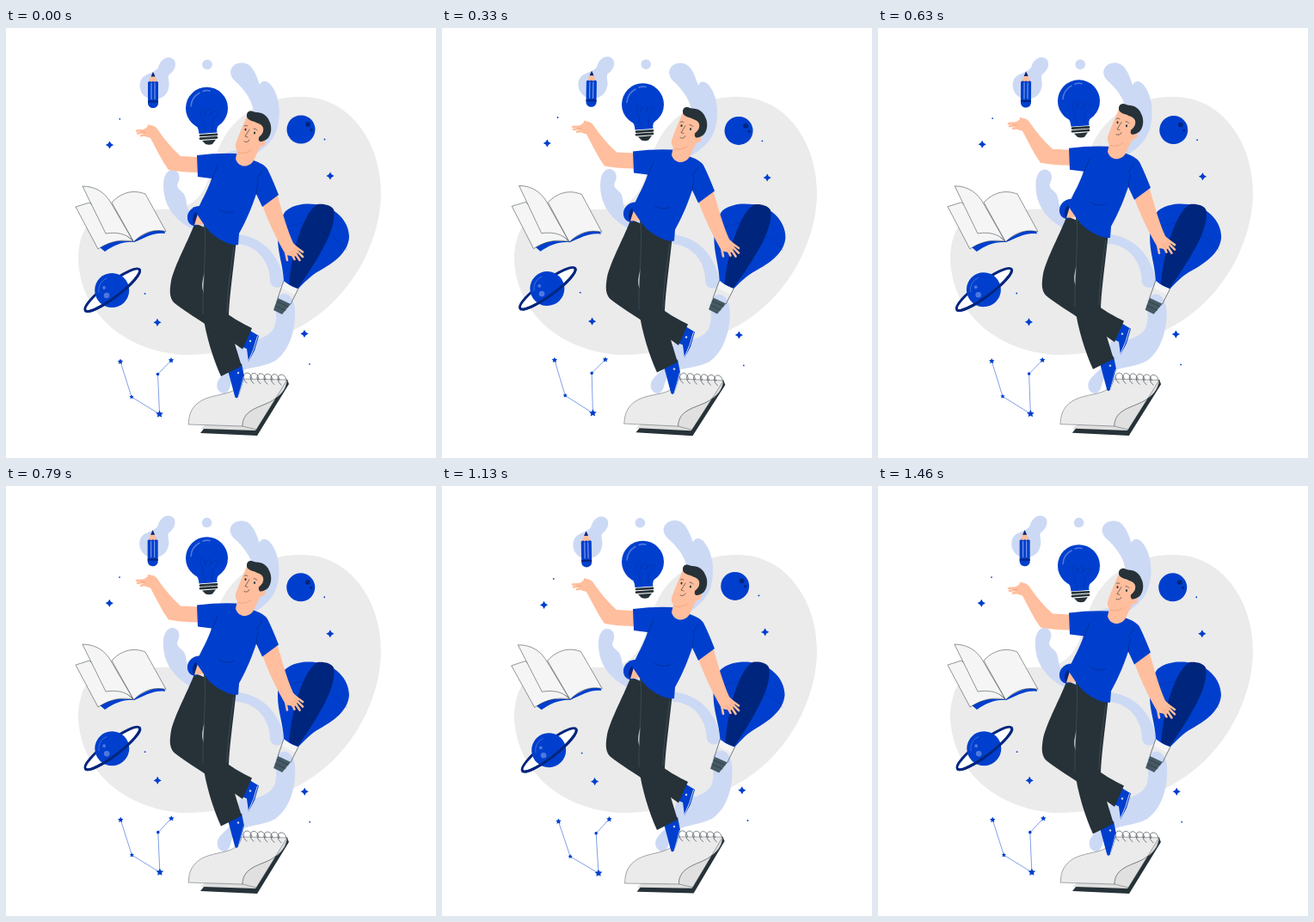
An HTML page that plays this animation: 500x500 px, repeating every 1500 ms.

```html
<!DOCTYPE html>
<html lang="en">
<head>
<meta charset="utf-8">
<title>Floating ideas</title>
<style>
  html, body { margin: 0; width: 100%; height: 100%; overflow: hidden; background: #fff; }
  svg { display: block; width: 100vw; height: 100vh; }
  .blue { fill: #003fcd; }
  .navy { fill: #00257d; }
  .pale { fill: #ccd9f5; }
  .dark { fill: #263238; }
  .skin { fill: #ffbe9d; }
  .fingers { fill: none; stroke: #ffbe9d; stroke-width: 2.6; stroke-linecap: round; stroke-linejoin: round; }
  .page { fill: #f5f5f5; stroke: #263238; stroke-width: .5; stroke-linejoin: round; }
  .ink { fill: none; stroke: #263238; stroke-width: .6; stroke-linecap: round; stroke-linejoin: round; }
  .seam { fill: none; stroke: #00257d; stroke-width: .6; stroke-linecap: round; }
  .crease { fill: none; stroke: #eb996e; stroke-width: .6; stroke-linecap: round; }
</style>
</head>
<body>
<svg viewBox="0 0 500 500" xmlns="http://www.w3.org/2000/svg">
  <path fill="#ebebeb" d="M343 80C400 79 436 134 436 191C436 250 400 319 335 351C290 373 245 380 205 380C138 375 87 332 84 270C84 235 100 211 130 210C160 210 172 212 195 210C240 206 235 160 252 130C269 98 305 80 343 80Z"/>

  <g id="sky">
    <!-- ribbon -->
    <path class="pale" d="M261 51C262 42 272 38 281 42C288 46 292 57 295 66C298 60 303 61 307 65C317 76 321 98 315 118C310 133 298 142 286 149L248 152Q256 143 270 142L288 99C287 86 280 75 269 64C264 60 261 56 261 51Z"/>
    <path class="pale" d="M183 183C183 171 188 164 195 165C202 167 203 174 200 180C197 186 203 188 207 193C211 200 209 209 214 214L232 226V240C207 232 183 215 183 183Z"/>
    <path class="pale" d="M255 239C284 238 304 250 315 270C320 279 323 288 323 294C323 304 309 304 307 295C307 279 300 264 286 256C277 251 266 250 255 250Z"/>
    <path class="pale" d="M319 310C328 306 335 314 336 328C337 352 329 376 313 387C297 396 273 394 265 405C260 412 262 424 253 425C245 424 243 414 248 408C254 400 262 397 264 388L272 364C290 364 303 361 311 350C317 339 312 324 314 316Z"/>
    <path class="pale" d="M177 46C180 34 191 31 196 38C199 45 194 51 189 55C188 60 191 64 189 70C187 80 178 84 169 83C159 81 154 72 156 63C159 52 172 54 177 46Z"/>
    <circle class="pale" cx="234" cy="42.500" r="5.800"/>

    <!-- pencil -->
    <path class="skin" d="M171 51L177 64H165Z"/>
    <path class="navy" d="M171 51L173.500 56.500H168.500Z"/>
    <path class="blue" d="M165 63Q168 61 169 63Q171 61 173 63Q175 61 177 63V87C177 95 165 95 165 87Z"/>
    <path d="M169 64V83M173 64V83" stroke="#ccd9f5" stroke-width=".7"/>
    <path d="M165 85.500H177" stroke="#00257d" stroke-width="2"/>

    <!-- moon -->
    <circle class="blue" cx="343" cy="118" r="16.500"/>
    <circle class="navy" cx="351" cy="112" r="2.900"/>
    <circle class="navy" cx="355" cy="118.500" r="1.600"/>

    <!-- ringed planet -->
    <g transform="rotate(-37 123.700 304.700)">
      <ellipse cx="123.700" cy="304.700" rx="39.500" ry="8.500" fill="#fff" stroke="#00257d" stroke-width="3"/>
    </g>
    <circle class="blue" cx="123.200" cy="305" r="20"/>
    <path d="M108 308A15 15 0 0 1 117 291" fill="none" stroke="#4d78df" stroke-width=".8"/>
    <circle cx="117" cy="311" r="3.300" fill="#4d78df"/>
    <circle cx="114" cy="302" r="1.900" fill="#4d78df"/>
    <g transform="rotate(-37 123.700 304.700)">
      <path d="M84.200 304.700A39.500 8.500 0 0 0 163.200 304.700" fill="none" stroke="#00257d" stroke-width="3"/>
    </g>

    <!-- constellation -->
    <path d="M133 388L146 429L178.500 449L176.500 402.500L192 386.500" fill="none" stroke="#003fcd" stroke-width=".5"/>
    <circle class="blue" cx="176.500" cy="402.500" r="1.800"/>
    <g id="stars" class="blue"></g>
  </g>

  <g id="pad">
    <path fill="#e0e0e0" d="M275 408L327 409L328 413L291 469L226 466L240 455Z"/>
    <path class="dark" d="M230 466L226 471L292 474L329 414L327 409L290 468Z"/>
    <path fill="#ebebeb" stroke="#263238" stroke-width=".4" d="M274 408C270 431 239 422 222 437C212 446 213 455 212 461L275 463C275 441 301 441 313 431C323 424 326 417 327 409Z"/>
    <path fill="#e0e0e0" stroke="#263238" stroke-width=".4" d="M275 463C275 441 301 441 313 431C323 424 326 417 327 409L291 467Z"/>
    <path id="rings" class="ink"/>
  </g>

  <g id="book">
    <path class="blue" d="M109 255C123 245 135 248 148 248C163 237 174 234 184 235L185 239C172 237 161 244 149 249C136 248 125 253 115 260Z"/>
    <path class="page" d="M81 208L97 203L148 248C134 246 122 247 107 257Z"/>
    <path class="page" d="M89 184C105 184 116 192 123 205L148 248C140 239 129 237 116 239Z"/>
    <path class="page" d="M123 203C135 190 149 188 162 193L186 236.500C170 233 158 239 148.500 248.500Z"/>
  </g>

  <g id="balloon">
    <path d="M323 294L340 303L336 310L320 302Z" fill="#f5f5f5"/>
    <path class="ink" d="M323 294L316 314M340 303L331 321"/>
    <path class="blue" d="M325 213C336 204 350 204 360 205C382 207 399 224 399 243C398 262 379 274 365 282C354 288 347 296 340 303Q331 301 323 294C322 275 316 262 316 244C316 231 320 220 325 213Z"/>
    <path class="navy" d="M362 205C370 204 378 206 381 211C384 223 376 244 367 259C359 274 348 290 339 303L329 298C331 277 335 255 343 234C348 222 353 211 362 205Z"/>
    <path class="seam" opacity=".4" d="M317 238Q337 226 348 227Q370 237 375 242Q387 245 396 258"/>
    <path fill="#455a64" d="M316 314L331 321L321 333L311 328Z"/>
    <path class="ink" d="M315 318L328 324M313 323L325 328.500"/>
  </g>

  <g id="man">
    <!-- bulb -->
    <circle class="blue" cx="233.500" cy="93.200" r="24.500"/>
    <path class="blue" d="M219 111Q224 115 224.500 123L245.500 121.500Q244 116 249 110Z"/>
    <path d="M215 91A19 19 0 0 1 225 75.500M229 73.500Q233 72 237 73" fill="none" stroke="#4d78df" stroke-width="1.600" stroke-linecap="round"/>
    <path class="seam" opacity=".5" d="M232 121L227 101Q224 94 229 94Q233 97 231 102Q235 93 238 95Q240 101 236 102Q243 94 247 97Q245 104 240 106L240 120"/>
    <path d="M225 123.500L246 122V128L242 135H231L226 130Z" fill="#fff"/>
    <path d="M226 125L245 123.800M226 128.600L245 127.300" stroke="#263238" stroke-width="2.700" stroke-linecap="round"/>
    <path class="dark" d="M228 131L244 129.700L240 135Q236 136.500 232 135Z"/>

    <!-- far leg -->
    <path class="blue" d="M284 352L294 358L289 375L282 388L280 373L275 371Z"/>
    <path d="M292.500 358L288 373L282 387" fill="none" stroke="#ccd9f5" stroke-width="1"/>
    <circle cx="284" cy="364" r="1.200" fill="#ccd9f5"/>
    <path class="dark" d="M219.500 227C213 245 196 276 192 294C190 306 190 313 195 319C206 329 244 351 275 373.500L286 349C274 343 265 338 257 332L250 240Z"/>
    <path fill="#ebebeb" d="M231 284C227 297 228 304 230 308Z"/>

    <!-- near leg -->
    <path class="blue" d="M258 398L274 390L277 405C275 415 272 423 270 429Q267 432 266 428L262 413Z"/>
    <path d="M276.500 405Q273 419 270 429" fill="none" stroke="#ccd9f5" stroke-width=".8"/>
    <circle cx="270" cy="401" r="1.200" fill="#ccd9f5"/>
    <path class="dark" d="M230 226L267.500 250C265 275 260 310 259 333C260 350 268 373 274 393L250 405C241 385 232 357 229 332C229 303 232 270 231 250Z"/>
    <path d="M231 230C233 265 228 302 229 332M265 254C261 280 257 312 257 331" fill="none" stroke="#455a64" stroke-width=".6"/>

    <!-- far side of the shirt -->
    <path class="blue" d="M226 207C215 207 210 215 211 222C212 228 217 231 222 230Z"/>
    <path class="navy" d="M224 212C217 215 215 224 219 230L226 226Z"/>
    <path class="skin" d="M223 216L233 228L219 229Z"/>

    <!-- raised arm -->
    <path class="skin" d="M224 150L203 149C193 140 184 129 177 119C175 115 171 113 167 113L160 118L159 125Q164 127 168 128C175 141 181 154 189 165Q205 168 224 168Z"/>
    <path class="fingers" d="M166 113.500L170 117M162 119L152 119.500M162 121L153 122.500M163 124L157 125.200"/>
    <path class="crease" d="M157 121L162 121.500"/>

    <!-- lowered arm -->
    <path class="skin" d="M297 203L315 192C321 213 327 235 334 250L341 257L336 266L326 264Q323 260 322 258C313 242 304 223 297 203Z"/>
    <path class="fingers" d="M336 254L345 260.500M336 257L345 266M335 260L341.500 270M331 260L335.500 269M325 260L327 270"/>
    <path class="crease" d="M340 259.500L336 256.500M339 263L334 259M335 265L331 260"/>

    <!-- shirt -->
    <path class="blue" d="M222 148Q246 145 268 146L288 154Q300 158 304 164C309 174 313 184 317 194L298 208L291 193C284 214 277 228 271 239L270 252C262 254 247 246 238 238C232 232 226 222 221 215C227 201 235 188 239 175L223 173Z"/>
    <path class="seam" d="M240 175L246 160M291 193L293 178M291 176L298 166M247 211Q256 217 265 213"/>

    <!-- head -->
    <path class="skin" d="M270 138L267 152C270 163 283 163 288 154L296 137Z"/>
    <path class="skin" d="M281 101C276 112 271 123 267 135C266 142 270 146 279 145C288 145 293 141 296 138C301 138 303 134 301 130L304 112Z"/>
    <path class="crease" d="M270 145Q279 147 285 142"/>
    <path class="dark" d="M280.500 104.500C279 100 281 97 284 96.500C287 96 288 98 291 98C298 98 304 102 306 108C309 113 309 121 306 126C304 130 299 132 295 132Q293 130 294 127C298 124 300 120 299 116C298 112 293 111 289 109Q283 107.500 280.500 104.500Z"/>
    <path class="ink" stroke-width=".8" d="M277 114Q279 112 281 114M288 117Q291 117 292 119M283 118Q280 123 278 126L281 127M277 132Q281 134 283 130"/>
    <ellipse class="dark" cx="278.500" cy="118" rx="1" ry="1.500"/>
    <ellipse class="dark" cx="289" cy="122" rx="1" ry="1.500"/>
  </g>
</svg>
<script>
  const LOOP = 1500, STEPS = 36;
  const el = id => document.getElementById(id);

  // Star outline: alternating outer and inner radius
  function star(x, y, points, outer, inner) {
    let d = '';
    for (let i = 0; i < points * 2; i++) {
      const a = i * Math.PI / points - Math.PI / 2;
      const r = i % 2 ? inner : outer;
      d += (i ? 'L' : 'M') + (x + r * Math.cos(a)).toFixed(2) + ' ' + (y + r * Math.sin(a)).toFixed(2);
    }
    return `<path d="${d}Z"/>`;
  }
  const dot = (x, y) => `<circle cx="${x}" cy="${y}" r=".9"/>`;

  el('stars').innerHTML =
    [[120.5, 136], [377, 172], [176, 342.3], [347, 355.5]].map(([x, y]) => star(x, y, 4, 4.6, 2.3)).join('') +
    [[133, 388, 3.4], [192, 386.5, 3.4], [146, 429, 2.7], [178.5, 449, 4.5]].map(([x, y, r]) => star(x, y, 5, r, r / 2)).join('') +
    [[132.3, 105.8], [370.5, 129.5], [161.6, 309], [353, 390.8]].map(p => dot(...p)).join('');

  let rings = '';
  for (let i = 0; i < 6; i++) {
    const x = 276 + i * 8, y = 406 + i * 0.4;
    rings += `M${x} ${y}C${x} ${y - 7} ${x + 9} ${y - 7} ${x + 10} ${y + 2}M${x} ${y}Q${x} ${y + 4} ${x + 4} ${y + 7}`;
  }
  el('rings').setAttribute('d', rings);

  // Rotation centres of the swaying parts
  const pivots = { sky: [250, 250], pad: [270.5, 437], book: [133.5, 222], balloon: [355, 269] };

  function sway(p) {
    if (p < 0.25) return p * 4;
    if (p < 0.75) return 2 - p * 4;
    return p * 4 - 4;
  }
  const lift = p => -10 * (1 - Math.abs(1 - 2 * p));

  function draw(ms) {
    // 24 steps per second
    const p = Math.floor(((ms % LOOP) + 5) * STEPS / LOOP) % STEPS / STEPS;
    for (const id in pivots) {
      const [x, y] = pivots[id];
      el(id).setAttribute('transform', `rotate(${sway(p)} ${x} ${y})`);
    }
    el('man').setAttribute('transform', `translate(0 ${lift(p)})`);
  }

  let start;
  function tick(now) {
    start ??= now;
    draw(now - start);
    requestAnimationFrame(tick);
  }
  draw(0);
  requestAnimationFrame(tick);
</script>
</body>
</html>
```
